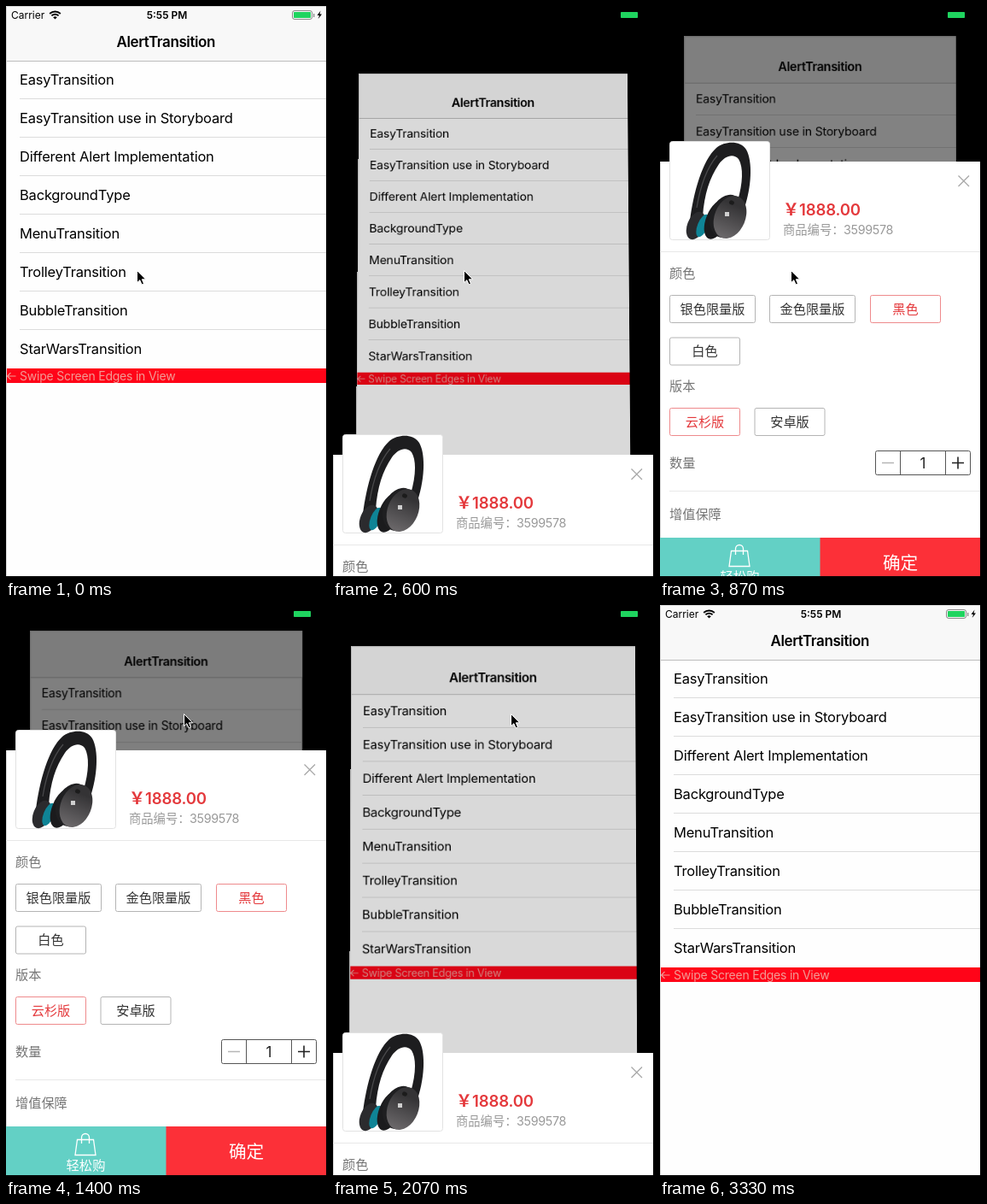
Write an HTML page that moves like this. It is 376 px wide and 668 px high and loops after 3390 ms.

```html
<!DOCTYPE html>
<html lang="zh-CN">
<head>
<meta charset="utf-8">
<title>AlertTransition</title>
<style>
html, body { margin: 0; width: 376px; height: 668px; overflow: hidden; background: #000; }
svg, #dim { position: absolute; left: 0; top: 0; }
#list { transform-origin: 188px 334px; }
#dim { width: 376px; height: 668px; background: #000; }
text { font-family: Inter, "Noto Sans CJK SC", "Noto Sans CJK JP", sans-serif; white-space: pre; }
</style>
</head>
<body>
<svg id="list" width="376" height="668"></svg>
<div id="dim"></div>
<svg width="376" height="667">
  <linearGradient id="metal" x2="0" y2="1">
    <stop offset=".2" stop-color="#343335"/>
    <stop offset="1" stop-color="#6c696b"/>
  </linearGradient>
  <g id="panel"></g>
  <g id="status"></g>
  <path id="cursor" d="M0 0V14.2L3.3 11.2L5.6 16.4L8 15.4L5.8 10.3H10.2Z" stroke="#fff" stroke-width="1"/>
</svg>
<script>
const $ = id => document.getElementById(id);
const RED = '#e4393c', GREY = '#757575';

const rect = (x, y, w, h, fill, extra = '') =>
  `<rect x="${x}" y="${y}" width="${w}" height="${h}" fill="${fill}" ${extra}/>`;
const path = (d, stroke, width = 1, extra = '') =>
  `<path d="${d}" fill="none" stroke="${stroke}" stroke-width="${width}" ${extra}/>`;
const ellipse = (x, y, rx, ry, fill) =>
  `<ellipse rx="${rx}" ry="${ry}" fill="${fill}" transform="translate(${x} ${y}) rotate(22)"/>`;
// y is the visual middle of the line
const text = (s, x, y, size, fill = '#000', extra = '') =>
  `<text x="${x}" y="${y}" dy=".36em" font-size="${size}" fill="${fill}" ${extra}>${s}</text>`;
const centred = (s, x, y, size, fill, extra = '') =>
  text(s, x, y, size, fill, 'text-anchor="middle" ' + extra);
const option = (s, x, y, w, on) =>
  rect(x + .5, y + .5, w, 32, '#fff', `rx="2" stroke="${on ? '#ee8a8c' : '#b4b4b4'}"`) +
  centred(s, x + w / 2 + .5, y + 16.5, 15.2, on ? RED : '#333');

const rows = ['EasyTransition', 'EasyTransition use in Storyboard', 'Different Alert Implementation',
  'BackgroundType', 'MenuTransition', 'TrolleyTransition', 'BubbleTransition', 'StarWarsTransition'];

$('list').innerHTML =
  rect(0, 0, 375, 667, '#fefefe') +
  rect(0, 0, 375, 64, '#f8f8f8') +
  rect(0, 64, 375, 1, '#bcbcbc') +
  centred('AlertTransition', 187.3, 42, 17, '#000', 'font-weight="600" letter-spacing="-.38"') +
  rows.map((s, i) =>
    text(s, 16, 86 + 45 * i, 16.5, '#000', 'letter-spacing="-.2"') +
    (i < 7 ? rect(16, 108 + 45 * i, 359, 1, '#dcdcdc') : '')).join('') +
  rect(0, 424, 375, 17, '#ff0418') +
  path('M11.5 433H1.5M5.5 429L1.5 433L5.5 437', '#f29a94', 1.1) +
  text('Swipe Screen Edges in View', 16, 432.5, 14, '#f29a94', 'letter-spacing="-.22"') +
  path('M.5 667V.5H375', '#d4d4d4');

const headphones =
  '<path d="M35 240C39 206 50 168 66 154C76 146 94 145 101 156C109 170 107 200 99 224L91 216C97 195 98 177 92 167C86 160 76 163 69 173C58 189 52 208 50 234Z" fill="#1d1d1f"/>' +
  path('M43 224C47 200 55 177 67 163', '#4a4a4c', 1.2) +
  ellipse(42, 245, 10, 17, '#2b2b2e') +
  ellipse(50, 245, 6, 14, '#0f8496') +
  ellipse(66, 238, 12, 24, '#1b1b1d') +
  ellipse(78, 234, 19, 26, '#1f1f21') +
  ellipse(82, 235, 18, 26, 'url(#metal)') +
  ellipse(84, 218, 3, 2.5, '#1c1c1c') +
  rect(76, 229, 5, 5, '#cfcfcf');

$('panel').innerHTML =
  rect(0, 170, 375, 497, '#fff') +
  path('M.5 170V610', '#d4d4d4') +
  rect(11.5, 146.5, 117, 115, '#fff', 'rx="3" stroke="#e2e2e2"') +
  headphones +
  path('M349.5 186.5L362 199M362 186.5L349.5 199', '#a8a8a8', 1.3) +
  text('￥', 144, 226, 19, RED, 'font-weight="600"') +
  text('1888.00', 163, 226, 18.6, RED, 'font-weight="600" letter-spacing="-.18"') +
  text('商品编号：', 144, 249.5, 14.3, '#999') +
  text('3599578', 215, 249.5, 14.3, '#999', 'letter-spacing="-.3"') +
  rect(0, 275, 375, 1, '#e8e8e8') +
  text('颜色', 11, 301, 15.2, GREY) +
  option('银色限量版', 11, 326, 100) +
  option('金色限量版', 128, 326, 100) +
  option('黑色', 246, 326, 82, true) +
  option('白色', 11, 375.5, 82) +
  text('版本', 11, 433, 15.2, GREY) +
  option('云杉版', 11, 458, 82, true) +
  option('安卓版', 110.5, 458, 82) +
  text('数量', 11, 523, 15.2, GREY) +
  rect(252.5, 508.5, 111, 28, '#fff', 'rx="2" stroke="#555"') +
  path('M281.5 508V537M334.5 508V537', '#555') +
  path('M260 522.5H274', '#b5b5b5', 1.5) +
  path('M342 522.5H356M349 515.5V529.5', '#222', 1.6) +
  centred('1', 308, 523, 17, '#222') +
  rect(11, 555, 364, 1, '#e8e8e8') +
  text('增值保障', 11, 583, 15.2, GREY) +
  rect(0, 610, 188, 57, '#63d0c5') +
  rect(187.5, 610, 187.5, 57, '#fc3038') +
  path('M83.5 625.5H102.5L105 643.5H81ZM88.5 630V623A4.5 4.5 0 0 1 97.5 623V630', '#fff', 1.3) +
  centred('轻松购', 93.5, 655, 15.3, '#fff') +
  centred('确定', 281.5, 639.5, 20.6, '#fff');

$('status').innerHTML =
  text('Carrier', 6, 10.5, 12) +
  path('M51.2 9A9.3 9.3 0 0 1 63.8 9M53.4 11.4A6 6 0 0 1 61.6 11.4', '#000', 1.9) +
  '<path d="M55.2 13.2A3.4 3.4 0 0 1 59.8 13.2L57.5 15.6Z"/>' +
  centred('5:55 PM', 188.5, 10.5, 12, '#000', 'font-weight="600"') +
  rect(335.5, 5.5, 23, 10, 'none', 'rx="2.5" stroke="#000" stroke-opacity=".45"') +
  rect(337, 7, 20, 7, '#1fd45f', 'rx=".8"') +
  rect(360, 9, 1.3, 4, '#000', 'fill-opacity=".45"') +
  '<path d="M368.5 5.5L364.5 11H367L365.7 15L370 9.5H367.4Z"/>';

const LOOP = 3390, STEP = 1000 / 15, SLIDE = 522, OPEN = 402, CLOSE = 1743;
const clamp = x => Math.min(1, Math.max(0, x));
const quad = x => x < .5 ? 2 * x * x : 1 - 2 * (1 - x) ** 2;
const sine = x => (1 - Math.cos(Math.PI * clamp(x))) / 2;
const mix = (a, b, k) => a.map((v, i) => v + (b[i] - v) * k);

// poses: scale, tilt in degrees, vertical shift
const FLAT = [1, 0, 0], TILT_IN = [.85, 12, 19.5], BACK = [.85, 0, -20], TILT_OUT = [.838, 11, 13];
const swing = (x, from, via, to, turn, end) =>
  x < turn ? mix(from, via, sine(x / turn)) : mix(via, to, sine((x - turn) / (end - turn)));

const START = [153.5, 309.5], TAP = [208.5, 127.5], AWAY = [392, 690];

function draw(now) {
  const t = Math.floor((now % LOOP + 4) / STEP) * STEP;
  const opening = (t - OPEN) / SLIDE, closing = (t - CLOSE) / SLIDE;
  const shown = quad(clamp(opening)) - quad(clamp(closing));

  const [scale, tilt, shift] = closing > 0
    ? swing(closing, BACK, TILT_OUT, FLAT, .364, 1)
    : swing(Math.max(0, opening), FLAT, TILT_IN, BACK, .38, 1.04);
  $('list').style.transform =
    `perspective(4500px) translateY(${shift}px) rotateX(${tilt}deg) scale(${scale})`;
  $('dim').style.opacity = .5 * shown;
  $('panel').setAttribute('transform', `translate(0 ${Math.round(498 * (1 - shown))})`);
  $('panel').style.display = shown > 0 ? '' : 'none';

  const spot = t < 2300 ? mix(START, TAP, sine((t - 1100) / 260)) : mix(TAP, AWAY, sine((t - 2330) / 340));
  $('cursor').setAttribute('transform', `translate(${spot})`);
}

const begin = performance.now();
(function tick() {
  draw(performance.now() - begin);
  requestAnimationFrame(tick);
})();
</script>
</body>
</html>
```
